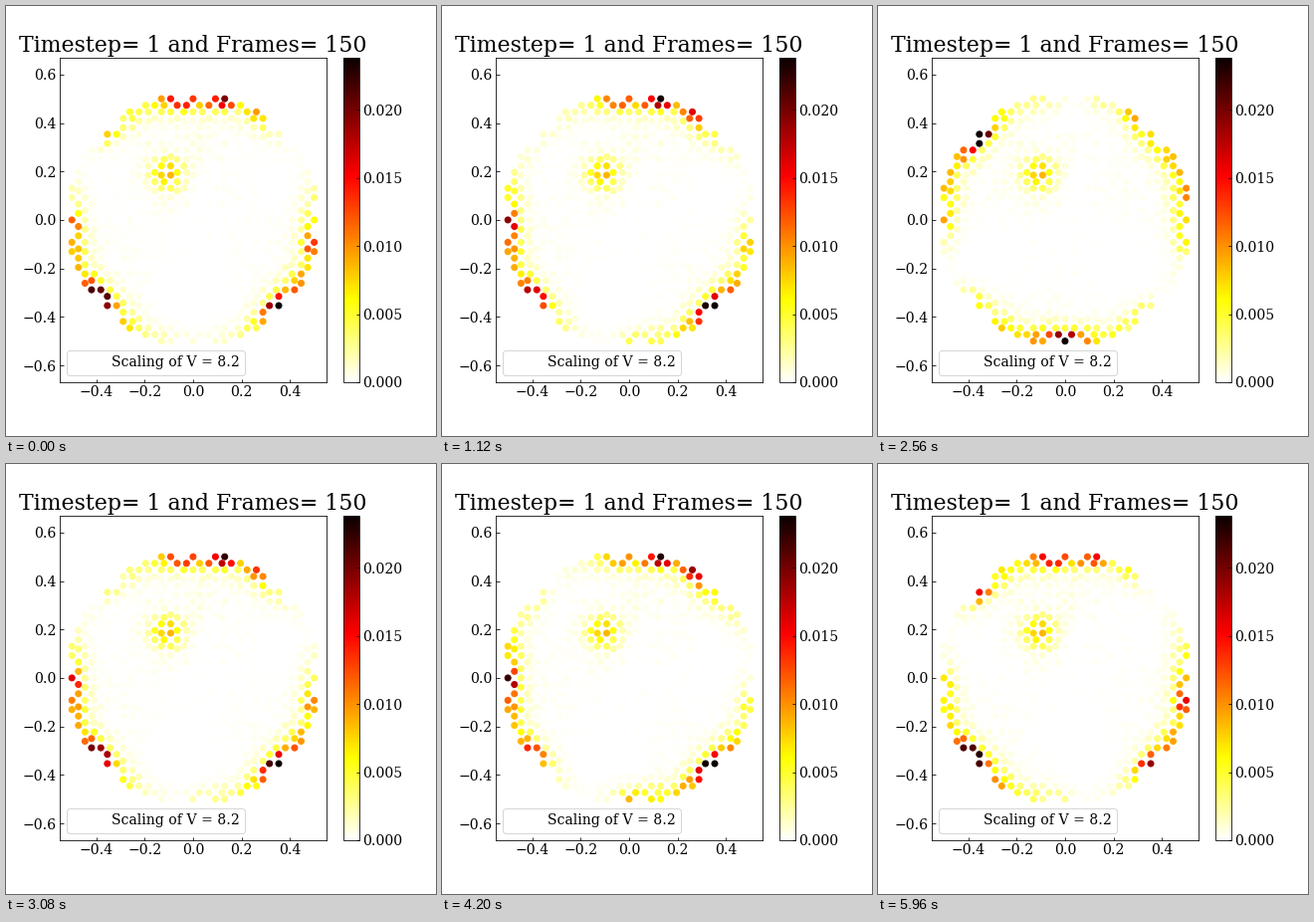
Write a matplotlib script that moves like this. It is 432 by 432 pixels and loops after 6 s.

```python
import numpy as np
import matplotlib.pyplot as plt
from matplotlib.animation import FuncAnimation

FRAMES = 150
OMEGA = 0.25              # phase advance per frame, rad
LOBES = 3
START = np.radians(90.8)  # direction of one lobe at t = 0
VMAX = 0.02384
RADIUS = 6 + 10 / np.sqrt(2)  # patch apothem in edge lengths

# Hot spots along the rim: direction in degrees -> extra density / 1e-3
HOT = {136: 32, 97: 8, 75: 13, 57: 10, -10: 9, -47: 22, -90: 18,
       -140: 21, -178: 13}
HOT_WIDTH = 6

plt.rcParams.update({
    "font.family": "DejaVu Serif",
    "font.size": 14,
    "xtick.direction": "in",
    "ytick.direction": "in",
})


def oct_norm(x, y):
    u, v = np.abs(x), np.abs(y)
    return np.maximum(np.maximum(u, v), (u + v) / np.sqrt(2))


def octagonal_tiling():
    """Vertices of the eightfold Ammann-Beenker tiling by cut and project."""
    r = np.arange(-8, 9)
    a, b, c, d = (g.ravel() for g in np.meshgrid(r, r, r, r))
    s = np.sqrt(0.5)
    x, y = a + s * (b - d), c + s * (b + d)
    inner = oct_norm(a - s * (b - d), s * (b + d) - c) < (1 + np.sqrt(2)) / 2
    keep = inner & (oct_norm(x, y) < RADIUS + 1e-6)
    return x[keep], y[keep]


def bump(x, y, cx, cy, width):
    return np.exp(-((x - cx) ** 2 + (y - cy) ** 2) / width ** 2)


def hot_spots(theta):
    """Sum of narrow bumps in direction, wrapped at 180 degrees."""
    total = 0
    for angle, height in HOT.items():
        gap = (np.degrees(theta) - angle + 180) % 360 - 180
        total = total + height * 1e-3 * np.exp(-(gap / HOT_WIDTH) ** 2)
    return total


x, y = octagonal_tiling()
depth = RADIUS - oct_norm(x, y)
theta = np.arctan2(y, x)
rng = np.random.default_rng(4)
noise = rng.random((3, x.size))

# The edge mode circles along the rim; the rest stays put
rim = 0.0095 * np.exp(-(depth / 1.5) ** 2) * (0.75 + 0.5 * noise[0])
tail = 0.0014 * np.exp(-depth / 4) * noise[1]
swing = rim + tail + hot_spots(theta) * np.exp(-depth ** 4)
steady = (0.0085 * bump(x, y, -2.8, 5, 1.7)
          + 0.0008 * noise[2] ** 2 * bump(x, y, -1, 5, 6.5))


def density(n):
    wave = np.cos(LOBES * (theta - START) + OMEGA * n)
    return steady + swing * (0.03 + 0.97 * (1 + wave) / 2)


fig = plt.figure(figsize=(6, 6), dpi=72, facecolor="white")
fig.subplots_adjust(left=0.125, right=0.9, bottom=0.125, top=0.88)
ax = fig.add_subplot()
scale = 0.5 / RADIUS
dots = ax.scatter(x * scale, y * scale, c=density(0), s=36, cmap="hot_r",
                  vmin=0, vmax=VMAX)
fig.colorbar(dots, ax=ax)
ax.set_xlim(-0.55, 0.55)
ax.set_ylim(-0.6698, 0.6698)
ax.set_xticks([-0.4, -0.2, 0, 0.2, 0.4])
ax.set_title("Timestep= 1 and Frames= 150", fontsize=22)
ax.plot([], [], " ", label="Scaling of V = 8.2")
ax.legend(loc="lower left")


def update(n):
    dots.set_array(density(n))
    return dots,


anim = FuncAnimation(fig, update, frames=FRAMES, interval=40, repeat=True,
                     repeat_delay=0)
plt.show()
```
